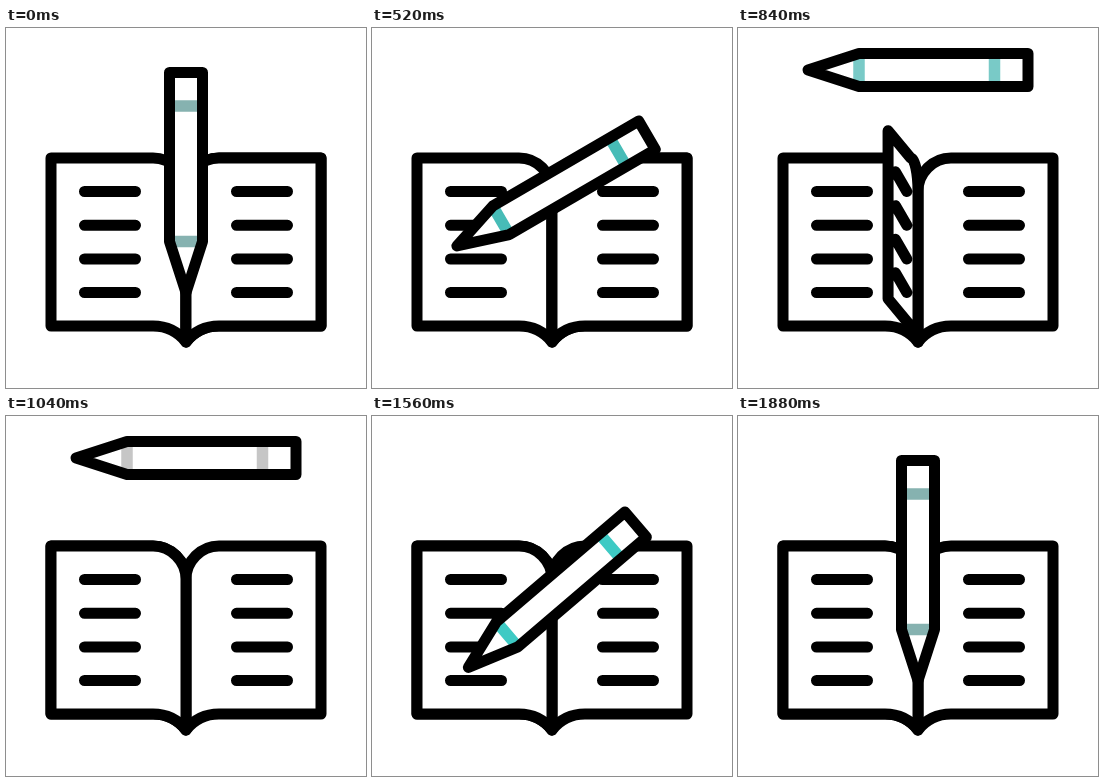
An HTML page that plays this animation: 360x360 px, repeating every 2 s.

```html
<!DOCTYPE html>
<html lang="en">
<head>
<meta charset="utf-8">
<title>Book and pencil</title>
<style>
  html, body { margin: 0; width: 100%; height: 100%; overflow: hidden; background: #fff; }
  svg { display: block; width: 100%; height: 100%; }
  .ink { fill: #fff; stroke: #000; stroke-width: 11; stroke-linecap: round; stroke-linejoin: round; }
</style>
</head>
<body>
<svg viewBox="0 0 360 360">
  <path class="ink" id="left"/>
  <path class="ink" id="right"/>
  <path class="ink" id="turning"/>
  <g id="pencil">
    <path id="body" fill="#fff" d="M-110 0L-59 -16.5H110V16.5H-59Z"/>
    <path id="bands" stroke-width="11.5" d="M-59 -16.5V16.5M76.5 -16.5V16.5"/>
    <path class="ink" style="fill:none" d="M-110 0L-59 -16.5H110V16.5H-59Z"/>
  </g>
</svg>
<script>
const LOOP = 2000, STEP = 40, SPINE = 180;
const el = id => document.getElementById(id);
const mix = (a, b, p) => a + (b - a) * p;

// Eased progress from 0 to 1 between two times.
function ease(t, start, end) {
  const u = Math.min(1, Math.max(0, (t - start) / (end - start)));
  return u * u * (3 - 2 * u);
}

// One page; side runs from 1 (right) to -1 (left), lift raises the outer edge.
function pagePath(side, lift) {
  const x = d => SPINE + d * side;
  const lines = [163.5, 197.3, 231, 264.5]
    .map(y => `M${x(50.5)} ${y}L${x(101.5)} ${y - lift * 0.72}`).join('');
  return `M${SPINE} 163C${x(0)} 145 ${x(15)} 130 ${x(33)} 130` +
    `L${x(135)} ${130 - lift}V${298 - lift}L${x(33)} 298` +
    `C${x(18)} 298 ${x(7)} 305 ${SPINE} 314Z` + lines;
}

const tints = [
  [0, 134, 178, 176], [360, 82, 170, 166], [680, 60, 205, 199], [1040, 198, 198, 198],
  [1280, 198, 198, 198], [1400, 55, 205, 200], [1560, 62, 202, 196],
  [1880, 134, 178, 176], [2000, 134, 178, 176]
];

function tintAt(t) {
  const i = tints.findIndex(k => k[0] > t);
  const a = tints[i - 1], b = tints[i];
  const p = (t - a[0]) / (b[0] - a[0]);
  return `rgb(${[1, 2, 3].map(c => Math.round(mix(a[c], b[c], p)))})`;
}

function draw(t) {
  const upright = 1 - ease(t, 80, 800) + ease(t, 1280, 1880);
  const y = 154.5 + 25.5 * ease(t, 80, 440) - 138 * ease(t, 440, 800)
    + 138 * ease(t, 1280, 1560) - 25.5 * ease(t, 1560, 1880);
  el('pencil').setAttribute('transform', `translate(${SPINE} ${y}) rotate(${-90 * upright})`);
  el('bands').setAttribute('stroke', tintAt(t));

  const turn = ease(t, 570, 1040);
  el('turning').setAttribute('d', pagePath(1 - 2 * turn, 29 * Math.sin(Math.PI * turn)));
}

function tick() {
  const t = performance.now() % LOOP;
  draw(Math.floor(t / STEP) * STEP);
  requestAnimationFrame(tick);
}

el('left').setAttribute('d', pagePath(-1, 0));
el('right').setAttribute('d', pagePath(1, 0));
tick();
</script>
</body>
</html>
```
